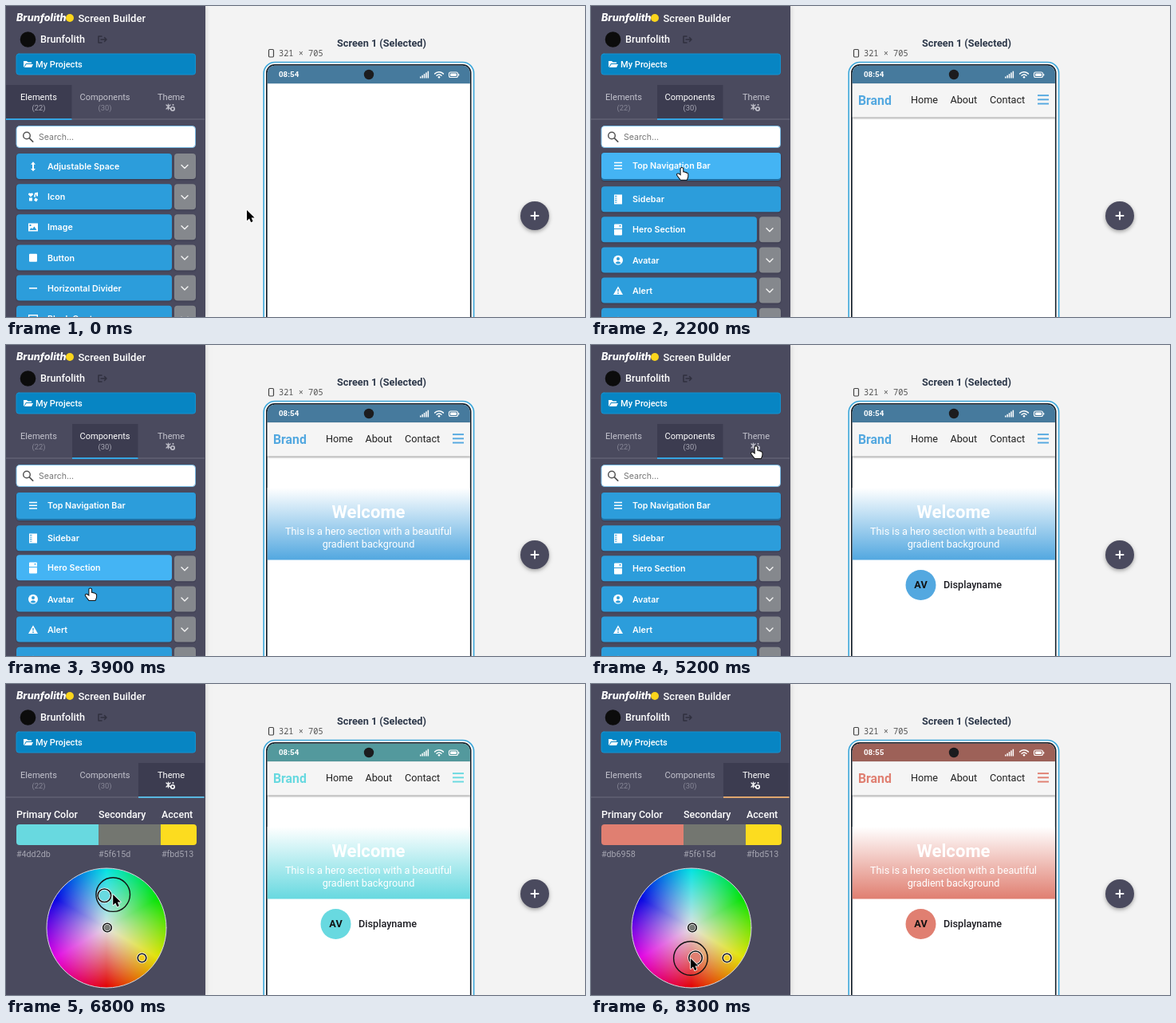
Write an HTML page with a canvas that moves like this. It is 726 px wide and 390 px high and loops after 8400 ms.

```html
<!DOCTYPE html>
<html lang="en">
<head>
<meta charset="utf-8">
<title>Screen Builder</title>
<style>
  html, body { margin: 0; width: 100%; height: 100%; overflow: hidden; background: #f3f3f3; }
  canvas { display: block; width: 726px; height: 390px; }
</style>
</head>
<body>
<canvas id="stage"></canvas>
<script>
const LOOP = 8400;
const canvas = document.getElementById('stage');
const ctx = canvas.getContext('2d');
const dpr = window.devicePixelRatio || 1;
canvas.width = 726 * dpr;
canvas.height = 390 * dpr;

const UI = 'Roboto, sans-serif', SYS = 'Inter, sans-serif', MONO = '"Noto Sans Mono", monospace';
const NAME = 'Brunfolith';
const PANEL = '#4a4a5e', DARK = '#3c3c50', BLUE = '#2c9ddb', MUTED = '#c3c3cd';

// Moments of the story, in ms
const COMPONENTS_AT = 1250, NAV_AT = 2200, HERO_AT = 3400, AVATAR_AT = 4300,
      THEME_AT = 5450, DRAG_AT = 6450, MINUTE_AT = 8000;

// ---------- maths ----------
const clamp = v => Math.min(1, Math.max(0, v));
const smooth = v => v * v * (3 - 2 * v);
const mix = (a, b, k) => a.map((v, i) => v + (b[i] - v) * k);
const rgb = c => `rgb(${c.map(Math.round).join()})`;
const hex = c => '#' + c.map(v => Math.round(v).toString(16).padStart(2, '0')).join('');

function track(keys, t, ease = v => v) {
  let i = 0;
  while (i < keys.length - 2 && t > keys[i + 1][0]) i++;
  const [a, b] = [keys[i], keys[i + 1]];
  return mix(a, b, ease(clamp((t - a[0]) / (b[0] - a[0])))).slice(1);
}

function hsv(h, s, v) {
  return [5, 3, 1].map(n => {
    const k = (n + h / 60) % 6;
    return 255 * v * (1 - s * Math.max(0, Math.min(k, 4 - k, 1)));
  });
}

// ---------- colour wheel ----------
const WHEEL = { x: 126, y: 306, r: 75 };
function polar(deg, r) {
  const a = deg * Math.PI / 180;
  return [WHEEL.x + r * Math.cos(a), WHEEL.y - r * Math.sin(a)];
}
const pickKeys = [[6550, 204, .76], [6800, 183.8, .648], [7500, 105.7, .671], [8300, 7.8, .598], [8400, 0, .59]];
const pick = t => track(pickKeys, t);
const primaryAt = t => hsv(...pick(t), 219 / 255);
const screenTint = c => mix(c, [255, 255, 255], .15);

// ---------- pointer ----------
const pointerKeys = [
  [200, 302, 256], [1000, 131, 128], [1400, 131, 128], [2000, 115, 203], [2500, 112, 205],
  [2900, 110, 261], [3200, 108, 281], [3600, 107, 282], [4100, 105, 319], [4500, 105, 319],
  [5150, 207, 128], [5600, 207, 128], [6350, 106, 262], [6450, 106, 262]
];
const dragKeys = [[6450, 114, 48], [6800, 79, 42.7], [7500, 14, 41], [8300, -91.5, 38], [8400, -104, 38]];
const pointerAt = t => t < DRAG_AT ? track(pointerKeys, t, smooth) : polar(...track(dragKeys, t));

// ---------- drawing helpers ----------
function text(str, x, midY, size, color, weight = 400, family = UI, align = 'left', style = '') {
  ctx.font = `${style} ${weight} ${size}px ${family}`;
  ctx.textAlign = align;
  ctx.fillStyle = color;
  ctx.fillText(str, x, midY + size * .355);
}
function box(x, y, w, h, r, fill, stroke, width = 1) {
  ctx.beginPath();
  ctx.roundRect(x, y, w, h, r);
  paint(fill, stroke, width);
}
function disc(x, y, r, fill, stroke, width = 1) {
  ctx.beginPath();
  ctx.arc(x, y, r, 0, 7);
  paint(fill, stroke, width);
}
function paint(fill, stroke, width) {
  if (fill) { ctx.fillStyle = fill; ctx.fill(); }
  if (stroke) { ctx.strokeStyle = stroke; ctx.lineWidth = width; ctx.stroke(); }
}
function shape(d, x, y, fill, stroke, width = 1.5) {
  const path = new Path2D(d);
  ctx.save();
  ctx.translate(x, y);
  ctx.lineCap = ctx.lineJoin = 'round';
  if (stroke) { ctx.strokeStyle = stroke; ctx.lineWidth = width; ctx.stroke(path); }
  if (fill) { ctx.fillStyle = fill; ctx.fill(path, 'evenodd'); }
  ctx.restore();
}
function shadowed(color, blur, dy, draw) {
  ctx.save();
  ctx.shadowColor = color;
  ctx.shadowBlur = blur * dpr;
  ctx.shadowOffsetY = dy * dpr;
  draw();
  ctx.restore();
}

// Icons are centred on 0,0
const ICON = {
  space: 'M0-6L3-2.6H1V2.6H3L0 6L-3 2.6H-1V-2.6H-3Z',
  shapes: 'M-3 0L-6-3Q-6-6-3-4.5Q0-6 0-3ZM2-5L6-6V-1H4V-3H3V0H1ZM-5 1H-1V5H-5ZM3 1L6 3L4 6L1 4Z',
  image: 'M-6-5H6V5H-6ZM-4.5 3.5H4.5L1.5-1L-1 2L-2.5.5ZM-4.5-3.5V-1.5H-2.5V-3.5Z',
  square: 'M-4-5H4Q5-5 5-4V4Q5 5 4 5H-4Q-5 5-5 4V-4Q-5-5-4-5Z',
  minus: 'M-5-.8H5V.8H-5Z',
  quote: 'M-6-5H6V5H-6ZM-4.7-3.5V3.5H4.7V-3.5Z',
  menu: 'M-5-4.5H5V-3H-5ZM-5-.7H5V.7H-5ZM-5 3H5V4.5H-5Z',
  sidebar: 'M-5-6H5V6H-5ZM-4-4.5V-3.5H-1.5V-4.5ZM-4-2V-1H-1.5V-2ZM-4 .5V1.5H-1.5V.5ZM-4 3V4H-1.5V3Z',
  hero: 'M-4-7H4Q5-7 5-6V-1.5H-5V-6Q-5-7-4-7ZM-5-.5H5V6Q5 7 4 7H-4Q-5 7-5 6ZM1.5-5.5V-4H3.5V-5.5Z',
  alert: 'M0-5.5L6 5H-6ZM-.8-2L-.5 1.5H.5L.8-2ZM-.8 2.5V4H.8V2.5Z',
  folder: 'M-6-4H-2L-.5-2.5H4V-1H-3L-5.5 3.5H-6ZM-2.5 0H6L4 4H-5Z',
  chevron: 'M-4-2L0 2L4-2',
  exit: 'M-1-4H-5V4H-1M-2 0H5M2.5-2.5L5 0L2.5 2.5',
  arrow: 'M0 0V13.2L3.1 10.4L5.2 15.2L7.6 14.1L5.6 9.5H9.6Z',
  hand: 'M-1.3 0Q0-1.4 1.3 0V5Q3 4 3.6 5.4Q5.2 4.7 5.7 6.2Q7.4 5.8 7.4 7.6V10Q7 12 6 14H-1.4Q-3.5 11.5-5.8 8.2Q-6.3 6.4-4.2 6.8L-1.3 9Z'
};

const elementRows = [
  ['Adjustable Space', 'space'], ['Icon', 'shapes'], ['Image', 'image'],
  ['Button', 'square'], ['Horizontal Divider', 'minus'], ['Block Quote', 'quote']
].map(([label, icon], i) => ({ label, icon, y: 185 + 38.15 * i, split: true }));
const componentRows = [
  ['Top Navigation Bar', 'menu'], ['Sidebar', 'sidebar'], ['Hero Section', 'hero'],
  ['Avatar', 'avatar'], ['Alert', 'alert'], ['Badge', 'alert']
].map(([label, icon], i) => ({ label, icon, y: 185 + 38.15 * i + (i ? 3 : 0), split: i > 1, edge: !i }));

// ---------- left panel ----------
function drawRow(row, hover) {
  const w = row.split ? 195 : 225, y = row.y - hover, mid = y + 16.3;
  shadowed('rgba(20,20,40,.3)', 2, 1, () => {
    if (row.edge) box(13, y, w, 35, 4, '#237fb8');
    box(13, y, w, row.edge ? 33 : 32, 4, rgb(mix([44, 157, 219], [68, 180, 244], hover)));
    if (row.split) box(211, row.y, 27, 32, 4, '#85888d');
  });
  if (row.icon === 'avatar') {
    disc(34, mid, 6, '#fff');
    disc(34, mid - 1.8, 2, BLUE);
    shape('M-3.5 3.6Q0-.8 3.5 3.6Q0 6 -3.5 3.6Z', 34, mid, BLUE);
  } else shape(ICON[row.icon], 34, mid, '#fff');
  text(row.label, 52, mid, 10.7, '#fff', 600, SYS);
  if (row.split) shape(ICON.chevron, 224, row.y + 16.5, null, '#f4f4f4', 1.4);
}

function drawTabs(t, active) {
  const switched = [0, COMPONENTS_AT, THEME_AT];
  const fade = active ? clamp((t - switched[active]) / 250) : 1;
  ctx.fillStyle = '#6d6d7e';
  ctx.fillRect(0, 141.5, 249, 1);
  [['Elements', 41, '(22)'], ['Components', 124, '(30)'], ['Theme', 207]].forEach(([label, x, count], i) => {
    const glow = i === active ? fade : i === active - 1 ? 1 - fade : 0;
    const color = rgb(mix([195, 195, 205], [255, 255, 255], glow));
    if (i === active) {
      ctx.fillStyle = DARK;
      ctx.fillRect(83 * i, 99, 82.5, 43);
      ctx.fillStyle = i === 2 ? rgb(screenTint(primaryAt(t - 180))) : '#35a5e2';
      ctx.fillRect(83 * i, 141, 82.5, 2);
    }
    text(label, x, 114, 11.07, color, 400, UI, 'center');
    if (count) text(count, x, 127.5, 9.4, glow > .5 ? '#a9a9b6' : '#878797', 400, UI, 'center');
    else {
      shape('M-5-3L0 2M-5 2L0-3M-2.5-4V3', 206, 127, null, color, 1.2);
      disc(209, 129, 2.2, null, color, 1.6);
      disc(209.5, 124, 1, color);
    }
  });
}

function drawWheel(t) {
  const { x, y, r } = WHEEL;
  const hues = ctx.createConicGradient(-Math.PI / 2, x, y);
  for (let i = 0; i <= 6; i++) hues.addColorStop(i / 6, `hsl(${540 - 60 * i},100%,50%)`);
  disc(x, y, r, hues);
  const centre = ctx.createRadialGradient(x, y, 0, x, y, r);
  centre.addColorStop(0, '#fff');
  centre.addColorStop(1, 'rgba(255,255,255,0)');
  disc(x, y, r, centre);
  disc(x, y, r, 'rgba(0,0,0,.11)', '#d6d6dc');

  const handle = (hx, hy, size, fill) => {
    disc(hx, hy, size, fill, '#fff', 3);
    disc(hx, hy, size, null, '#111', 1.6);
  };
  handle(127, 305.5, 5.3, '#777a75');
  handle(170.5, 343.5, 5.3, '#f3cf20');
  const [hue, sat] = pick(t);
  handle(...polar(hue - 90, sat * 63), 8.3, rgb(screenTint(primaryAt(t))));
  if (t >= DRAG_AT) disc(...pointerAt(t), 21.3, null, '#111', 1.4);
}

function drawTheme(t) {
  const primary = primaryAt(t);
  const swatches = [
    ['Primary Color', 13, 103, rgb(screenTint(primary)), hex(primary), [4, 0, 0, 4]],
    ['Secondary', 116, 78, '#737670', '#5f615d', 0],
    ['Accent', 194, 45, '#fcdc1f', '#fbd513', [0, 4, 4, 0]]
  ];
  swatches.forEach(([label, x, w, fill, code, radius], i) => {
    const labelX = x + (i === 2 ? 1 : 0);
    text(label, labelX, 164, 12.5, '#fff', 500);
    box(x, 176, w, 26, radius, fill);
    text(code, labelX, 213, 10.7, '#a5a5b1');
  });
  drawWheel(t);
}

function drawPanel(t) {
  const active = t >= THEME_AT ? 2 : t >= COMPONENTS_AT ? 1 : 0;
  shadowed('rgba(0,0,0,.2)', 6, 0, () => {
    ctx.fillStyle = PANEL;
    ctx.fillRect(0, 0, 250, 390);
  });
  text(NAME, 13, 15, 12.6, '#fff', 800, SYS, 'left', 'italic');
  disc(80, 15, 5, '#fbd51c');
  text('Screen Builder', 90.5, 15, 13, '#fff', 500);
  disc(27.5, 42, 9.8, '#0c0c0c');
  text(NAME, 43, 42, 12.66, '#fff', 500);
  shape(ICON.exit, 121, 42, null, '#30303f', 1.5);
  box(13, 60, 224.5, 26, 3, '#0785c3', '#1592d0');
  shape(ICON.folder, 28, 73, '#fff');
  text('My Projects', 37, 73, 11.07, '#fff', 500);
  drawTabs(t, active);
  if (active === 2) return drawTheme(t);

  box(13, 150.5, 224.5, 27, 4, '#fff', '#79bce6');
  disc(26, 162.5, 4.3, null, '#555', 1.5);
  shape('M0 0L4.5 4.5', 29.2, 165.7, null, '#555', 1.7);
  text('Search...', 41, 164, 10.55, '#777', 400, SYS);
  const [px, py] = pointerAt(t - 100);
  for (const row of active ? componentRows : elementRows) {
    const over = px > 13 && px < (row.split ? 208 : 238) && py > row.y && py < row.y + 32;
    drawRow(row, over ? 1 : 0);
  }
}

// ---------- phone preview ----------
function drawPhone(t) {
  const tint = screenTint(primaryAt(t)), color = rgb(tint);
  text('Screen 1 (Selected)', 471, 46.5, 12.66, '#2d384a', 700, UI, 'center');
  box(329.5, 54.5, 6, 9.5, 1.2, null, '#444', 1.2);
  text('321 × 705', 342, 59.5, 10.3, '#555', 400, MONO);

  box(323.2, 70.5, 263.4, 400, 14, '#fafafa', '#3ba6d9', 1.6);
  box(326, 73, 257.5, 400, 11, '#16202a');
  box(327.7, 74.8, 254.2, 400, 9, '#fff');
  box(327.7, 74.8, 254.2, 22.5, [9, 9, 0, 0], rgb(mix(tint, [48, 48, 48], .38)));
  text(t < MINUTE_AT ? '08:54' : '08:55', 342, 86, 9.8, '#fff', 600);
  disc(455, 86, 6.2, '#1c1c1e');
  ctx.fillStyle = '#fff';
  for (let i = 0; i < 5; i++) ctx.fillRect(519 + 2.4 * i, 88.5 - 1.7 * i, 1.5, 2 + 1.7 * i);
  ctx.lineCap = 'round';
  for (const r of [4, 7.3]) {
    ctx.beginPath();
    ctx.arc(543, 90, r, -2.4, -.74);
    paint(null, '#fff', 1.5);
  }
  disc(543, 89.3, 1.3, '#fff');
  box(555.5, 83, 11, 6.5, 2, null, '#fff', 1.1);
  box(557, 84.5, 8, 3.5, 1, '#fff');
  ctx.fillRect(567.3, 85, 1, 2.6);

  if (t >= NAV_AT) {
    shadowed('rgba(0,0,0,.35)', 2, 1, () => {
      ctx.fillStyle = '#f5f5f5';
      ctx.fillRect(327.7, 97.3, 254.2, 42.2);
    });
    text('Brand', 335, 118, 15.8, color, 700);
    text('Home', 401, 118, 12.66, '#222');
    text('About', 450.5, 118, 12.66, '#222');
    text('Contact', 500, 118, 12.66, '#222');
    ctx.fillStyle = color;
    for (const y of [111.2, 116.4, 121.6]) ctx.fillRect(560, y, 14, 1.9);
  }
  if (t >= HERO_AT) {
    const fade = ctx.createLinearGradient(0, 179, 0, 269);
    fade.addColorStop(0, '#fff');
    fade.addColorStop(1, color);
    ctx.fillStyle = fade;
    ctx.fillRect(327.7, 179, 254.2, 90.5);
    text('Welcome', 454.5, 209.5, 22.1, '#fff', 700, UI, 'center');
    text('This is a hero section with a beautiful', 454.5, 234, 12.66, '#fff', 400, UI, 'center');
    text('gradient background', 454.5, 249.5, 12.66, '#fff', 400, UI, 'center');
  }
  if (t >= AVATAR_AT) {
    disc(413.5, 301, 19, color);
    text('AV', 413.5, 301, 12.66, '#111', 700, UI, 'center');
    text('Displayname', 442, 301, 12.66, '#1c1c22', 500);
  }
}

function drawPointer(t) {
  const [x, y] = pointerAt(t);
  const onTab = y > 99 && y < 142 && x < 249;
  const onRow = t < THEME_AT && x > 13 && x < 238 && y > 185 &&
    (t < COMPONENTS_AT ? elementRows : componentRows).some(r => y > r.y && y < r.y + 32);
  if (onTab || onRow) shape(ICON.hand, x, y, '#fff', '#111', 2);
  else shape(ICON.arrow, x, y, '#000', '#fff', 1.6);
}

function render(t) {
  ctx.setTransform(dpr, 0, 0, dpr, 0, 0);
  ctx.fillStyle = '#f3f3f3';
  ctx.fillRect(0, 0, 726, 390);
  drawPhone(t);
  shadowed('rgba(0,0,0,.35)', 5, 2, () => disc(663, 263, 18, PANEL));
  shape('M-4.5 0H4.5M0-4.5V4.5', 663, 263, null, '#fff', 2);
  drawPanel(t);
  drawPointer(t);
}

const start = performance.now();
function tick() {
  render((performance.now() - start) % LOOP);
  requestAnimationFrame(tick);
}
tick();
</script>
</body>
</html>
```
